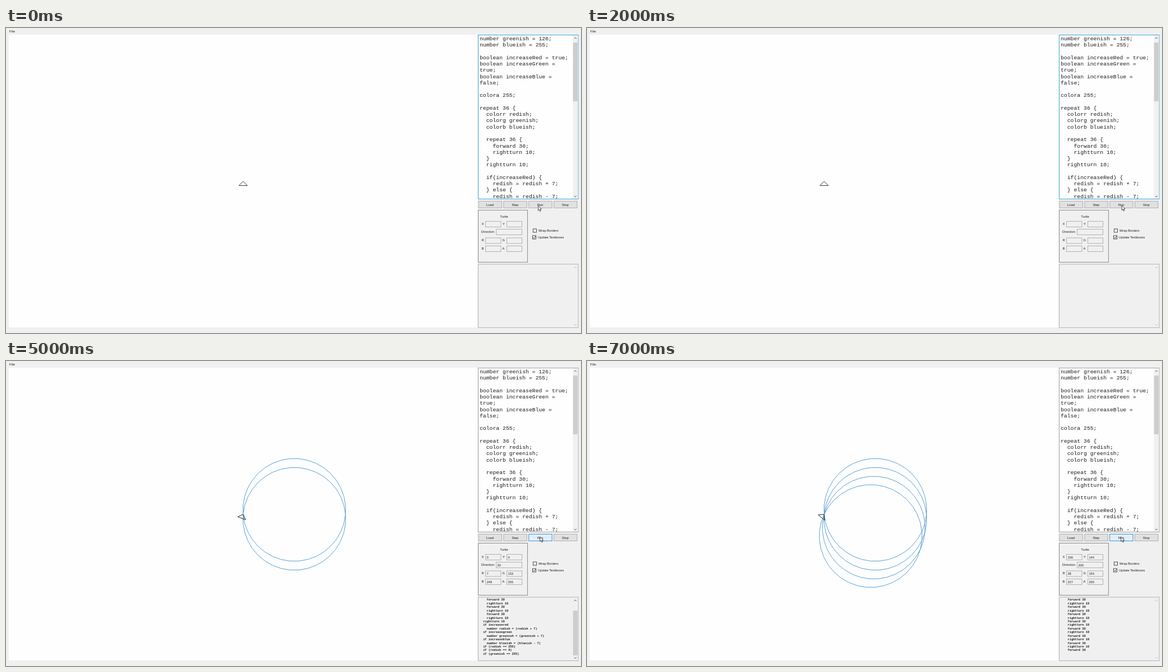
Recreate the animation shown at these times as an HTML page. Size 1027 px wide and 545 px high, loop 8000 ms.

```html
<!DOCTYPE html>
<html lang="en">
<head>
<meta charset="utf-8">
<title>Turtle</title>
<style>
html, body { margin: 0; width: 100%; height: 100%; overflow: hidden; background: #f0f0f0; }
svg { display: block; }
text { white-space: pre; fill: #1c1c1c; }
.ui { font: 5.8px "Liberation Sans", Arial, sans-serif; }
.code { font: 9.77px "Liberation Mono", "Courier New", monospace; }
.log { font: bold 5.36px "Liberation Mono", "Courier New", monospace; }
</style>
</head>
<body>
<svg id="stage" width="1027" height="545" viewBox="0 0 1027 545"></svg>
<script>
const stage = document.getElementById('stage');
const FORM = '#f0f0f0', EDGE = '#a3a3a3', FOCUS = '#42a9dc';

function add(tag, attrs, parent = stage) {
  const el = document.createElementNS('http://www.w3.org/2000/svg', tag);
  set(el, attrs);
  parent.appendChild(el);
  return el;
}
function set(el, attrs) {
  for (const k in attrs) el.setAttribute(k, attrs[k]);
}
function box(x, y, r, b, fill, stroke = 'none') {
  return add('rect', { x, y, width: r - x, height: b - y, fill, stroke });
}
function label(str, x, y, anchor = 'start') {
  const el = add('text', { x, y, class: 'ui', 'text-anchor': anchor });
  el.textContent = str;
  return el;
}
function chevron(y, dir) {
  return add('path', { d: `M1014.8 ${y + dir}l2.1 ${-2 * dir} 2.1 ${2 * dir}`, fill: 'none', 'stroke-width': 1, stroke: '#555' });
}
function lines(list, parent, cls, x, y, charW, pitch) {
  parent.textContent = '';
  list.forEach((s, i) => {
    const body = s.trimStart();
    if (body) add('text', { x: x + (s.length - body.length) * charW, y: y + i * pitch, class: cls }, parent).textContent = body;
  });
}

// Window and drawing area
box(0, 0, 1027, 545, FORM);
label('File', 6, 8.3).style.fontSize = '6.2px';
box(5, 12, 842, 535, '#fefefe');

// Editor
const editor = box(843.5, 12.5, 1022, 305.5, '#fefefe', EDGE);
box(1012.5, 13, 1021.5, 305, FORM);
box(1012.8, 26, 1020.8, 131, '#cdcdcd');
chevron(18, 1);
chevron(301, -1);
lines(`number greenish = 126;
number blueish = 255;

boolean increaseRed = true;
boolean increaseGreen =
true;
boolean increaseBlue =
false;

colora 255;

repeat 36 {
  colorr redish;
  colorg greenish;
  colorb blueish;

  repeat 36 {
    forward 30;
    rightturn 10;
  }
  rightturn 10;

  if(increaseRed) {
    redish = redish + 7;
  } else {
    redish = redish - 7;`.split('\n'), add('g', {}), 'code', 846, 22, 5.862, 11.265);

// Buttons
const buttons = ['Load', 'Step', 'Run', 'Stop'].map((name, i) => {
  const x = 844 + i * 44.85;
  const b = box(x, 309.5, x + 41.5, 321.5, '#e1e1e1', '#b0b0b0');
  label(name, x + 20.5, 317.6, 'middle');
  return b;
});
const run = buttons[2];

// Turtle state panel
box(843.5, 325.5, 931.5, 418.5, FORM, '#8c8c8c');
label('Turtle', 889.5, 338.6, 'middle');
const fields = [
  ['X', 849.5, 857, 884, 345.5], ['Y', 887, 895, 921.5, 345.5],
  ['Direction', 849, 876, 921.5, 359.5],
  ['R', 849.5, 857, 884, 375], ['G', 886.5, 895, 921.5, 375],
  ['B', 849.5, 857, 884, 389.5], ['A', 886.5, 895, 921.5, 389.5]
].map(([name, lx, x, r, y]) => {
  label(name, lx, y + 6.4);
  box(x - .5, y, r, y + 10, FORM, '#b0b0b0');
  return label('', x + 1.4, y + 7.1);
});

// Options
[['Wrap Borders', 941.5, 359], ['Update Textboxes', 940.5, 371]].forEach(([name, x, y]) => {
  box(x, y, x + 6, y + 6, '#fff', '#444');
  label(name, x + 9.5, y + 5.1);
});
add('path', { d: 'M941.8 374l1.4 1.5 2.6-3.2', fill: 'none', stroke: '#222', 'stroke-width': 1 });

// Log
box(843.5, 422, 1022, 535.5, FORM, '#b4b4b4');
const thumb = box(1012.8, 433, 1020.8, 462, '#cdcdcd');
const arrows = [chevron(428, 1), chevron(530.5, -1)];
const log = add('g', {});

// Turtle drawing
const HOME = { x: 423.5, y: 274 }, STEP = 16, RAD = Math.PI / 180;
const loops = [0, 1, 2, 3].map(k => {
  let { x, y } = HOME, d = `M${x} ${y}`;
  for (let i = 0; i < 36; i++) {
    const a = (k + i) * 10 * RAD;
    x += STEP * Math.sin(a);
    y -= STEP * Math.cos(a);
    d += `L${x.toFixed(2)} ${y.toFixed(2)}`;
  }
  return add('path', { d, fill: 'none', stroke: '#5199d3', 'stroke-width': .95 });
});
const turtle = add('path', { d: 'M0 0L-7.5 7.5H7.5Z', fill: 'none', stroke: '#222', 'stroke-width': .9 });
const cursor = add('path', { d: 'M0 0V8.3L1.9 6.6 3.2 9.7 4.6 9.1 3.3 6.1H5.9Z', fill: '#fff', stroke: '#222', 'stroke-width': .8 });

const turns = (n, first) => Array.from({ length: n }, (_, i) =>
  (i + first) % 2 ? '    rightturn 10' : '    forward 30');
const parsed = `    greenish = greenish + 7;
  } else {
    greenish = greenish - 7;
  }

  if(increaseBlue) {
    blueish = blueish + 7;
  } else {
    blueish = blueish - 7;
  }

  if(redish == 255) {
    increaseRed = false;
  }
  if(redish == 0) {
    increaseRed = true;`.split('\n');
const checks = `  rightturn 10
  if increasered
    number redish = (redish + 7)
  if increasegreen
    number greenish = (greenish + 7)
  if increaseblue
    number blueish = (blueish - 7)
  if (redish == 255)
  if (redish == 0)
  if (greenish == 255)`.split('\n');

// One state per second; rgb is the number of colour changes so far
const states = [
  { tip: [950.6, 317.8] },
  { tip: [953, 317.6] },
  { tip: [955.2, 317.2] },
  { log: parsed, thumb: [433, 462] },
  { loops: 1, pose: [0, 0, 10], rgb: 0, log: [...turns(11, 1), ...checks.slice(0, 5)], thumb: [486, 526] },
  { loops: 2, pose: [0, 0, 20], rgb: 1, log: [...turns(6, 0), ...checks], thumb: [446, 526] },
  { loops: 3, pose: [200, -93, 110], rgb: 3, log: turns(15, 0) },
  { loops: 4, pose: [156, 144, 200], rgb: 4, log: turns(15, 0) }
];

function show(i) {
  const s = states[i], n = s.loops || 0, running = i > 2;
  const [cx, cy] = s.tip || [953.8, 314.2];
  set(cursor, { transform: `translate(${cx} ${cy})` });
  set(editor, { stroke: running ? EDGE : FOCUS });
  set(run, running ? { stroke: '#3c96dc', fill: '#e5eef7' } : { stroke: '#b0b0b0', fill: '#e1e1e1' });
  loops.forEach((p, k) => set(p, { visibility: k < n ? 'visible' : 'hidden' }));
  set(turtle, { transform: `translate(${HOME.x} ${HOME.y}) rotate(${n * 10})` });
  const c = 7 * s.rgb;
  const values = s.pose ? [...s.pose, c, 126 + c, 255 - c, 255] : [];
  fields.forEach((f, k) => { f.textContent = values[k] ?? ''; });
  lines(s.log || [], log, 'log', 845.7, 428.3, 3.216, 6.44);
  const [top, bottom] = s.thumb || [433, 433];
  set(thumb, { y: top, height: bottom - top });
  arrows.forEach(a => set(a, { stroke: s.thumb ? '#555' : '#c0c0c0' }));
}

let shown = -1;
const start = performance.now();
function tick() {
  const i = Math.floor((performance.now() - start) % 8000 / 1000);
  if (i !== shown) show(shown = i);
  requestAnimationFrame(tick);
}
tick();
</script>
</body>
</html>
```
